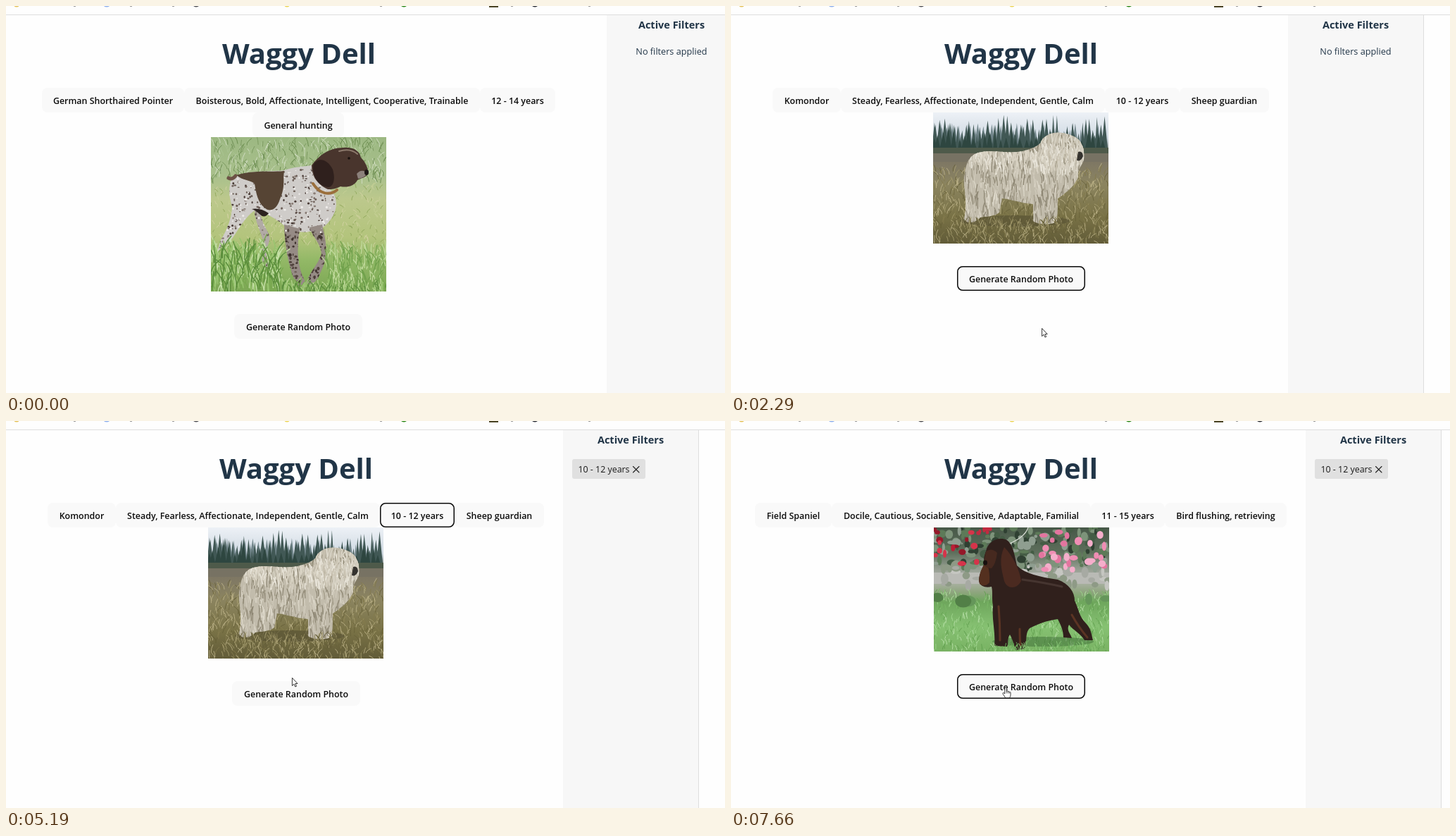
These frames come from a looping animation (1021x549 px, 8 s). An HTML page:

```html
<!DOCTYPE html>
<html lang="en">
<head>
<meta charset="utf-8">
<title>Waggy Dell</title>
<style>
html, body { margin: 0; width: 100%; height: 100%; overflow: hidden; background: #fefefe; }
svg { display: block; font-family: "Open Sans", "Noto Sans", sans-serif; }
.title { font-size: 40px; font-weight: 700; fill: #213547; }
.heading { font-size: 14.5px; font-weight: 700; fill: #213547; }
.note { font-size: 12.7px; fill: #213547; }
.label { font-size: 12.45px; font-weight: 600; fill: #0c0c0c; }
.pill { font-size: 12.4px; font-weight: 500; fill: #1a1a1a; }
text { text-anchor: middle; }
</style>
</head>
<body>
<svg id="stage" width="1021" height="549" viewBox="0 0 1021 549"></svg>
<script>
const LOOP = 8000, STEP = 70;
const stage = document.getElementById('stage');

function add(parent, tag, attrs = {}, text) {
  const el = document.createElementNS('http://www.w3.org/2000/svg', tag);
  for (const k in attrs) el.setAttribute(k, attrs[k]);
  if (text) el.textContent = text;
  parent.appendChild(el);
  return el;
}
const rect = (p, x, y, width, height, fill, rx = 0) => add(p, 'rect', { x, y, width, height, fill, rx });
const shape = (p, d, fill) => add(p, 'path', { d, fill });
const line = (p, d, stroke, width) => add(p, 'path', { d, stroke, fill: 'none', 'stroke-width': width, 'stroke-linecap': 'round' });
const label = (p, cls, x, y, text) => add(p, 'text', { class: cls, x, y }, text);
const show = (el, on) => el.setAttribute('display', on ? 'inline' : 'none');
const place = (el, x, y) => el.setAttribute('transform', `translate(${x} ${y})`);

let seed = 7;
function rnd(a = 0, b = 1) {
  seed = (seed * 16807) % 2147483647;
  return a + (b - a) * seed / 2147483647;
}
const pick = list => list[Math.floor(rnd(0, list.length))];

const defs = add(stage, 'defs');
function gradient(id, stops) {
  const g = add(defs, 'linearGradient', { id, x1: 0, y1: 0, x2: 0, y2: 1 });
  for (const [offset, color] of stops) add(g, 'stop', { offset, 'stop-color': color });
  return `url(#${id})`;
}
function clip(id, d) {
  add(add(defs, 'clipPath', { id }), 'path', { d });
  return `url(#${id})`;
}

// Thin random blades inside a box, gathered into one path per colour.
function blades(p, count, [x0, y0, x1, y1], len, lean, colors, width) {
  const paths = colors.map(() => '');
  for (let i = 0; i < count; i++) {
    const x = rnd(x0, x1), y = rnd(y0, y1), h = rnd(len / 2, len);
    paths[i % colors.length] += `M${x.toFixed(1)},${y.toFixed(1)}q${rnd(-1, 1).toFixed(1)},${(-h / 2).toFixed(1)} ${rnd(-lean, lean).toFixed(1)},${(-h).toFixed(1)}`;
  }
  paths.forEach((d, i) => line(p, d, colors[i], width));
}
function dots(p, count, [x0, y0, x1, y1], r0, r1, colors) {
  for (let i = 0; i < count; i++)
    add(p, 'ellipse', { cx: rnd(x0, x1), cy: rnd(y0, y1), rx: rnd(r0, r1), ry: rnd(r0, r1), fill: pick(colors) });
}

function photo(id, h, paint) {
  const outer = add(stage, 'g');
  const g = add(outer, 'g', { 'clip-path': clip(id, `M0,0H249V${h}H0Z`) });
  paint(g);
  return { el: outer, h };
}

function paintPointer(g) {
  rect(g, 0, 0, 249, 219, gradient('meadow', [[0, '#9cb882'], [.25, '#a9c08c'], [.4, '#bcc88c'], [.65, '#b3c47c'], [.8, '#92b866'], [1, '#7ba653']]));
  blades(g, 420, [0, 8, 249, 66], 13, 8, ['#7c9a61', '#cfdcc0', '#a9c391', '#6b8d50'], 1);
  blades(g, 380, [0, 70, 249, 165], 6, 5, ['#d2d2a2', '#93aa5e', '#c6d096'], 1);
  const near = 'M70,104C72,130 88,135 82,150C78,165 80,175 86,188L76,182C68,170 69,160 74,148C72,135 62,120 62,104Z';
  const body = 'M30,58C50,46 80,50 104,47C120,42 130,42 142,40L166,72C178,80 180,92 176,106C170,120 160,130 150,132C130,138 112,134 100,122C86,112 74,106 62,104C47,114 38,134 27,148C18,152 12,160 9,163L14,146C24,130 30,112 30,98C24,80 26,66 30,58Z';
  const legs = 'M104,124C105,150 108,170 113,186C116,200 122,208 127,213H136C135,204 130,200 127,188C122,168 123,150 126,130ZM140,128C146,145 156,150 157,166C152,180 142,190 135,206C140,212 146,208 152,200C156,190 164,178 163,164C165,150 160,135 158,124Z';
  shape(g, near, '#b1aaa5');
  shape(g, body, '#cfccc9');
  shape(g, legs, '#968b85');
  const coat = add(g, 'g', { 'clip-path': clip('coat', near + body + legs) });
  dots(coat, 560, [8, 44, 180, 214], .6, 1.9, ['#4b3d38', '#6d5f58', '#8a7d76']);
  dots(coat, 140, [100, 130, 166, 214], .8, 2.5, ['#3f322e', '#51433d']);
  dots(coat, 130, [20, 44, 175, 135], .6, 1.8, ['#eeebe9']);
  shape(g, 'M36,54C60,46 85,50 104,48C102,60 106,70 98,88C94,102 84,108 76,100C66,92 64,78 62,66C54,60 46,62 36,54Z', '#564434');
  shape(g, 'M58,102Q70,100 82,108Q76,116 70,110Q64,104 58,102Z', '#2c221f');
  line(g, 'M35,55Q30,61 25,58', '#6d5346', 5);
  shape(g, 'M143,40C152,28 166,15 188,15C202,14 211,19 213,29C218,34 223,42 223,50C222,58 214,57 208,61C204,69 194,72 184,70C176,74 172,74 166,74C152,68 143,56 143,40Z', '#49352d');
  shape(g, 'M145,40C151,28 165,30 173,46C177,60 174,70 167,71C154,70 144,58 145,40Z', '#2f201d');
  line(g, 'M182,20Q198,15 208,24', '#8b786b', 2);
  shape(g, 'M207,52Q214,44 222,51Q220,57 209,59Z', '#8c817b');
  add(g, 'ellipse', { cx: 221, cy: 50, rx: 3, ry: 4, fill: '#1d1716' });
  add(g, 'circle', { cx: 196, cy: 30, r: 1.8, fill: '#17100e' });
  line(g, 'M145,66C154,80 168,84 179,75', '#9b6f3c', 4);
  blades(g, 270, [0, 168, 100, 224], 32, 14, ['#78a94f', '#c4dfa6', '#97c46e', '#5b8e3c'], 1.4);
  blades(g, 170, [100, 212, 249, 226], 16, 9, ['#78a94f', '#b4d38e', '#97c46e', '#5d8f3f'], 1.3);
  blades(g, 170, [165, 165, 249, 214], 22, 9, ['#88b560', '#c0da9c', '#70a14c'], 1.2);
}

function paintKomondor(g) {
  rect(g, 0, 0, 249, 186, gradient('plain', [[0, '#edf1f6'], [.2, '#cfd9e2'], [.29, '#7b837d'], [.31, '#77705f'], [.4, '#807964'], [.55, '#8b845f'], [.8, '#787145'], [1, '#615b38']]));
  const row = (n, top, low, color) => {
    let d = '';
    for (let i = 0; i < n; i++) {
      const x = i * 249 / n + rnd(-2, 2), y = rnd(top, low), w = rnd(3, 6);
      d += `M${x},${y}L${x + w},55H${x - w}Z`;
    }
    shape(g, d, color);
  };
  row(55, 14, 34, '#71858a');
  row(48, 3, 32, '#415855');
  row(34, 20, 40, '#2e4640');
  rect(g, 0, 50, 249, 9, '#4e5a4a');
  rect(g, 0, 58, 249, 12, '#777263');
  blades(g, 900, [0, 82, 249, 194], 11, 8, ['#a39a6d', '#686139', '#bcb287', '#847b4d'], .9);
  add(g, 'ellipse', { cx: 116, cy: 154, rx: 78, ry: 8, fill: '#514b30', opacity: .55 });
  const dog = 'M52,66C58,54 80,54 100,56C120,58 140,54 152,44C157,30 175,24 195,32C210,36 216,50 214,66C212,76 204,80 206,92C200,106 186,116 177,122L176,154C170,160 150,160 142,154L142,130C120,128 108,122 98,122L94,142C84,150 70,146 66,150C58,158 46,158 44,150C50,130 43,110 44,92C46,78 48,70 52,66Z';
  shape(g, dog, '#c2bcac');
  const cords = add(g, 'g', { 'clip-path': clip('cords', dog) });
  blades(cords, 750, [40, 40, 216, 168], 15, 3, ['#ddd8ca', '#a49d8a', '#cfc9ba', '#8f8875'], 1.3);
  blades(cords, 170, [48, 56, 200, 88], 14, 4, ['#e8e4d9', '#d8d2c3'], 1.7);
  blades(cords, 150, [154, 38, 214, 90], 16, 4, ['#e6e2d6', '#c7c0af', '#d5d0c2'], 1.6);
  shape(g, 'M206,56Q212,54 213,62Q210,70 204,68Z', '#35332f');
  blades(g, 160, [30, 156, 190, 172], 12, 7, ['#8b8256', '#a79e72', '#655e3a'], 1);
}

function paintSpaniel(g) {
  rect(g, 0, 0, 249, 176, gradient('garden', [[0, '#475848'], [.2, '#5d6e5b'], [.32, '#8f998b'], [.42, '#b3b5ae'], [.52, '#8fa57f'], [.6, '#6ea65c'], [.8, '#86c172'], [1, '#79b263']]));
  dots(g, 170, [0, 0, 249, 58], 2, 7, ['#2f4032', '#5d7a58', '#7d937a', '#445c45', '#8f9e90']);
  rect(g, 0, 64, 249, 16, '#b9bab5');
  dots(g, 60, [0, 52, 249, 84], 2, 8, ['#a7aaa3', '#c5c6c1', '#8e9a86']);
  dots(g, 15, [0, 2, 66, 52], 2.5, 6, ['#bb1f36', '#d6344a', '#951829']);
  dots(g, 7, [60, 0, 90, 10], 2, 4, ['#c22a40']);
  dots(g, 30, [148, 4, 249, 62], 3, 6.5, ['#ef8eb4', '#f5aecb', '#e3759f']);
  blades(g, 650, [0, 94, 249, 182], 8, 4, ['#9ad188', '#62a050', '#b3dda3', '#79b866'], 1);
  dots(g, 15, [0, 90, 249, 106], 4, 13, ['#527f47', '#65965a']);
  add(g, 'ellipse', { cx: 155, cy: 162, rx: 72, ry: 7, fill: '#3d6c36', opacity: .5 });
  line(g, 'M134,0C130,12 118,18 106,24', '#dce0d8', 1.2);
  shape(g, 'M74,34C76,20 92,12 104,18C112,24 114,36 118,54C130,66 150,70 176,74C192,80 200,92 200,104C206,116 206,126 216,136C224,144 224,154 226,160L214,160C208,150 198,146 192,138C188,146 194,150 196,157L184,156C184,146 180,138 176,130C160,132 146,138 138,142C130,146 132,158 130,172L116,174C114,165 112,160 108,152C104,158 106,166 104,169L86,168C88,150 82,130 84,112C82,100 84,92 82,84C74,86 66,84 64,76C64,66 70,56 72,50C70,44 72,38 74,34Z', '#30201c');
  shape(g, 'M100,28C112,40 122,60 124,76C118,88 104,88 100,76C96,60 92,44 100,28Z', '#4b2a20');
  shape(g, 'M73,50C68,58 62,70 65,80Q72,86 79,78Q80,62 76,54Z', '#54301f');
  shape(g, 'M74,34Q82,28 90,36Q88,52 82,58Q72,58 71,50Z', '#46291f');
  add(g, 'ellipse', { cx: 73, cy: 50, rx: 3, ry: 3.5, fill: '#17100f' });
  line(g, 'M126,74Q156,78 182,84', '#463530', 3);
  line(g, 'M92,112Q94,136 94,160M122,144Q122,158 123,168M196,124Q206,142 218,156', '#5b3424', 3);
  blades(g, 90, [80, 168, 235, 178], 8, 4, ['#8ac877', '#68a857'], 1);
}

// Page furniture
rect(stage, 0, 0, 1021, 549, '#fefefe');
rect(stage, 0, 12, 1021, 1, '#dedede');
for (const [x, color, r] of [[15, '#e5c25a', 4], [143, '#8fb0ee', 6], [270, '#55565a', 5], [399, '#ecd557', 4], [565, '#2f8a1c', 5], [751, '#30333a', 5]])
  add(stage, 'circle', { cx: x, cy: 1.6 - r, r, fill: color });
rect(stage, 686, 0, 13, 2, '#4b4527');
for (const x of [96, 176, 236, 531, 717, 827]) rect(stage, x, 0, 3, 1, '#9a9a9a');

function button(parent, x, y, w, text) {
  const el = add(parent, 'g');
  place(el, x, y);
  rect(el, 0, 0, w, 35, '#f9f9f9', 8);
  const ring = add(el, 'rect', { x: .75, y: .75, width: w - 1.5, height: 33.5, rx: 7.25, fill: 'none', stroke: '#0a0a0a', 'stroke-width': 1.5 });
  label(el, 'label', w / 2, 23, text);
  return { el, ring, x, y, w };
}

function layout({ until, mid, side, end, head, photoX, photoY, genX, tags }) {
  const el = add(stage, 'g');
  rect(el, side, 13, end - side, 536, '#f7f7f7');
  if (end < 1021) rect(el, end, 13, 1, 536, '#dedede');
  label(el, 'title', mid, 82, 'Waggy Dell');
  label(el, 'heading', head, 32, 'Active Filters');
  const none = add(el, 'g');
  label(none, 'note', head, 69, 'No filters applied');
  const pill = add(el, 'g');
  place(pill, side + 13, 54);
  rect(pill, 0, 0, 104, 28, '#e0e0e0', 3);
  label(pill, 'pill', 45, 19, '10 - 12 years');
  line(pill, 'M86.5,10.5l8.5,8.5m0,-8.5l-8.5,8.5', '#222', 1.1);
  const buttons = tags.map(([x, y, w, text]) => button(el, x, y, w, text));
  return { until, el, none, pill, buttons, photoX, photoY, genX };
}

const layouts = [
  layout({ until: 1810, mid: 416, side: 853, end: 1021, head: 945, photoX: 291, photoY: 186, genX: 324, tags: [
    [51, 116, 202, 'German Shorthaired Pointer'],
    [253, 116, 420, 'Boisterous, Bold, Affectionate, Intelligent, Cooperative, Trainable'],
    [673, 116, 107, '12 - 14 years'],
    [350, 151, 130, 'General hunting']] }),
  layout({ until: 7330, mid: 412, side: 791, end: 983, head: 887, photoX: 287, photoY: 151, genX: 321, tags: [
    [59, 116, 97, 'Komondor'],
    [156, 116, 375, 'Steady, Fearless, Affectionate, Independent, Gentle, Calm'],
    [531, 116, 106, '10 - 12 years'],
    [637, 116, 127, 'Sheep guardian']] }),
  layout({ until: LOOP, mid: 412, side: 816, end: 1008, head: 912, photoX: 288, photoY: 151, genX: 321, tags: [
    [34, 116, 109, 'Field Spaniel'],
    [143, 116, 368, 'Docile, Cautious, Sociable, Sensitive, Adaptable, Familial'],
    [511, 116, 105, '11 - 15 years'],
    [616, 116, 173, 'Bird flushing, retrieving']] })
];

const photos = [
  { until: 2220, ...photo('pointer', 219, paintPointer) },
  { until: 7660, ...photo('komondor', 186, paintKomondor) },
  { until: LOOP, ...photo('spaniel', 176, paintSpaniel) }
];
const generate = button(stage, 324, 437, 182, 'Generate Random Photo');

// Mouse
const press = add(stage, 'circle', { r: 10, fill: '#ffff00', opacity: .45 });
const pointer = add(stage, 'g');
const outline = { fill: '#fff', stroke: '#222', 'stroke-width': .9, 'stroke-linejoin': 'round' };
const arrow = add(pointer, 'path', { d: 'M.4,.4V11.6L3,9.2L4.8,13L6.5,12.3L4.8,8.5H8Z', ...outline });
const hand = add(pointer, 'g');
add(hand, 'path', { d: 'M-1.2,9V1Q-1.2,-.4 0,-.4Q1.3,-.4 1.3,1V5.4Q2.6,4.4 3.4,5.8Q4.7,5 5.3,6.4Q7,6 7,7.6V10.4Q7,12.6 5.6,14.8H-.4Q-1.4,12.4 -3.8,9.4Q-4.6,8 -3.4,7.6Q-2.2,7.4 -1.2,9Z', ...outline });
line(hand, 'M1.3,5.4V8M3.4,5.8V8M5.3,6.4V8.2', '#222', .7);

const enter = [848, 540];
const moves = [ // start, end, x, y
  [100, 800, 443, 460], [1150, 1220, 442, 459], [2220, 2970, 408, 373],
  [3040, 3100, 434, 398], [3300, 4040, 573, 134], [4190, 4470, 438, 321],
  [4730, 4930, 406, 364], [5980, 6460, 390, 378]
];
const presses = [[940, 1010], [3970, 4040], [6460, 6600]];

function mouseAt(t) {
  let [x, y] = enter;
  for (const [start, end, tx, ty] of moves) {
    if (t < start) break;
    const k = t >= end ? 1 : Math.floor((t - start) / STEP) * STEP / (end - start);
    const e = k * k * (3 - 2 * k);
    x += (tx - x) * e;
    y += (ty - y) * e;
  }
  return [x, y];
}

function draw(t) {
  const page = layouts.find(l => t < l.until);
  const pic = photos.find(p => t < p.until);
  const filtered = t >= 4190;
  layouts.forEach(l => show(l.el, l === page));
  photos.forEach(p => show(p.el, p === pic));
  show(page.none, !filtered);
  show(page.pill, filtered);
  place(pic.el, page.photoX, page.photoY);
  generate.x = page.genX;
  generate.y = page.photoY + pic.h + 32;
  place(generate.el, generate.x, generate.y);

  const [x, y] = mouseAt(t), visible = t >= 100;
  const all = [...page.buttons, generate];
  const over = visible && all.find(b => x >= b.x && x < b.x + b.w && y >= b.y && y < b.y + 35);
  const focus = t < 940 ? null : t >= 3970 && t < 6460 ? page.buttons[2] : generate;
  all.forEach(b => show(b.ring, b === over || b === focus));

  show(pointer, visible);
  show(hand, !!over);
  show(arrow, !over);
  place(pointer, x, y);
  show(press, presses.some(([a, b]) => t >= a && t < b));
  place(press, x, y);
}

function tick() {
  draw(performance.now() % LOOP);
  requestAnimationFrame(tick);
}
tick();
</script>
</body>
</html>
```
